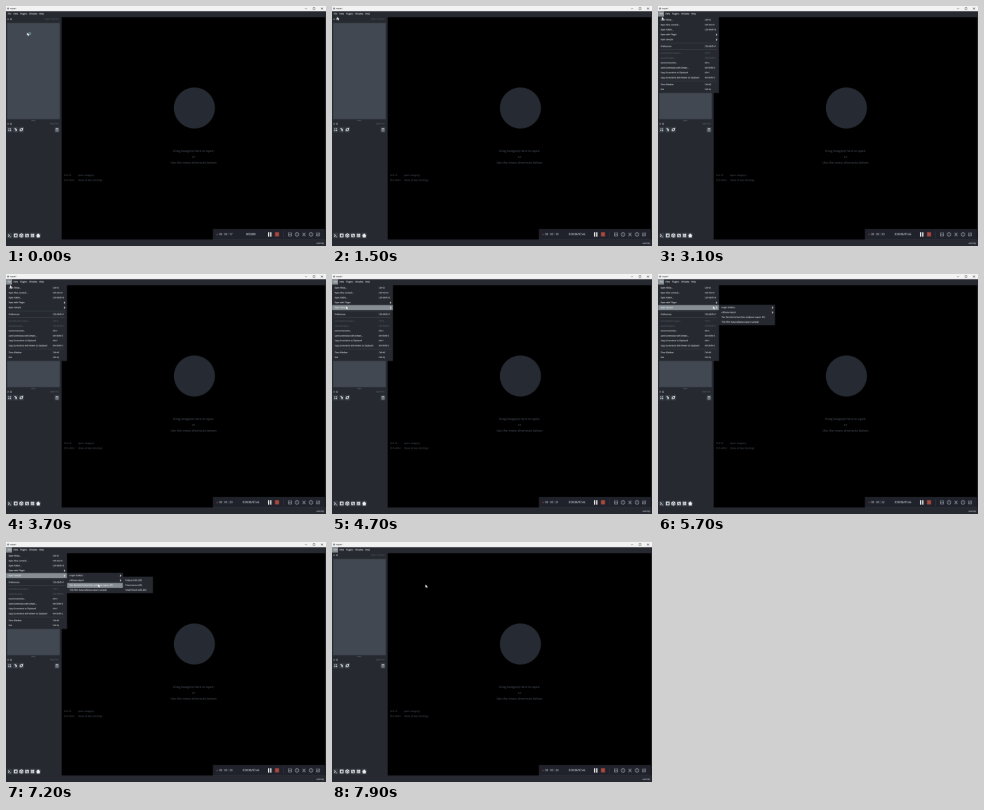
An HTML page with a canvas for the animation above (8 s loop, 320 by 240 pixels).

```html
<!DOCTYPE html>
<html lang="en">
<head>
<meta charset="utf-8">
<title>Image viewer menu</title>
<style>
html, body { margin: 0; height: 100%; overflow: hidden; background: #262930; }
canvas { display: block; width: 100vw; height: 100vh; }
</style>
</head>
<body>
<canvas id="stage" width="320" height="240"></canvas>
<script>
const LOOP = 8000;
const SCALE = 6;
const view = document.getElementById('stage').getContext('2d');
view.imageSmoothingQuality = 'high';

// The desktop is drawn large and scaled down, so tiny text stays soft.
const desktop = document.createElement('canvas');
desktop.width = 320 * SCALE;
desktop.height = 240 * SCALE;
const ctx = desktop.getContext('2d');
ctx.scale(SCALE, SCALE);

const C = {
  bg: '#262930', panel: '#414851', button: '#363c45', hover: '#868e93',
  text: '#f0f1f2', dim: '#5a626c', faint: '#414750', shape: '#262a33'
};

const FILE_MENU = [
  [14, 'Open File(s)...', 'Ctrl+O'],
  [19, 'Open Files as Stack...', 'Ctrl+Alt+O'],
  [23.8, 'Open Folder...', 'Ctrl+Shift+O'],
  [28.7, 'Open with Plugin', '>'],
  [33.6, 'Open Sample', '>'],
  [40.5, 'Preferences', 'Ctrl+Shift+P'],
  [47.2, 'Save Selected Layers...', 'Ctrl+S', true],
  [52.1, 'Save All Layers...', 'Ctrl+Shift+S', true],
  [57, 'Save Screenshot...', 'Alt+S'],
  [62, 'Save Screenshot with Viewer...', 'Alt+Shift+S'],
  [66.9, 'Copy Screenshot to Clipboard', 'Alt+C'],
  [71.8, 'Copy Screenshot with Viewer to Clipboard', 'Alt+Shift+C'],
  [78.6, 'Close Window', 'Ctrl+W'],
  [83.5, 'Exit', 'Ctrl+Q']
];
const SAMPLE_MENU = [
  [33.6, 'napari builtins', '>'],
  [38.5, 'cellpose-napari', '>'],
  [43.4, 'Two Particle Surface Data (cellpose-napari, 3D)'],
  [48.2, 'Thin Film Data (cellpose-napari, sample)']
];
const CELL_MENU = [
  [38.5, 'Embryo Cells (3D)'],
  [43.4, 'Fluorescence (2D)'],
  [48.2, 'Small Chunk Cells (2D)']
];

// time, x, y
const PATH = [
  [0, 21, 26.5], [200, 21, 26.5], [900, 9, 16], [1500, 5, 10.7],
  [2000, 5, 10.7], [2700, 3.8, 10.7], [3800, 4, 11], [4300, 9, 24],
  [4700, 14, 32], [5100, 54, 32], [5800, 55, 32], [6200, 72, 33],
  [6500, 88, 37.5], [6800, 92, 39], [7100, 92, 42], [8000, 93.5, 42.5]
];

function rect(x, y, w, h, color) {
  ctx.fillStyle = color;
  ctx.fillRect(x, y, w, h);
}

function disc(x, y, r, color) {
  ctx.fillStyle = color;
  ctx.beginPath();
  ctx.arc(x, y, r, 0, Math.PI * 2);
  ctx.fill();
}

function label(str, x, y, size = 1.95, color = C.text, align = 'left') {
  ctx.font = `600 ${size}px "Open Sans", sans-serif`;
  ctx.textAlign = align;
  ctx.textBaseline = 'middle';
  ctx.fillStyle = color;
  ctx.fillText(str, x, y);
}

function lines(color, width, ...strokes) {
  ctx.strokeStyle = color;
  ctx.lineWidth = width;
  ctx.beginPath();
  for (const points of strokes) {
    for (let i = 0; i < points.length; i += 2) {
      ctx[i ? 'lineTo' : 'moveTo'](points[i], points[i + 1]);
    }
  }
  ctx.stroke();
}

function box(x, y, size, color, width = .6) {
  ctx.strokeStyle = color;
  ctx.lineWidth = width;
  ctx.strokeRect(x - size / 2, y - size / 2, size, size);
}

function pointerAt(t) {
  const i = PATH.findIndex(p => p[0] > t);
  const [t0, x0, y0] = PATH[i - 1], [t1, x1, y1] = PATH[i];
  const k = (t - t0) / (t1 - t0), ease = k * k * (3 - 2 * k);
  return { x: x0 + (x1 - x0) * ease, y: y0 + (y1 - y0) * ease };
}

function drawTitleBar(open) {
  rect(0, 0, 320, 5.3, '#f3f3f3');
  disc(2.1, 2.6, 1, '#78848c');
  label('napari', 4, 2.6, 2, '#333');
  lines('#444', .4, [299, 2.6, 301, 2.6], [315, 1.7, 317, 3.5], [317, 1.7, 315, 3.5]);
  box(308, 2.6, 1.7, '#444', .4);
  rect(0, 5.3, 320, 5.7, C.bg);
  if (open) rect(0, 5.5, 6, 5, C.hover);
  [['File', 1.7], ['View', 7.3], ['Plugins', 14], ['Window', 23.3], ['Help', 33.3]]
    .forEach(([name, x]) => label(name, x, 8, 2.1));
}

function drawDockTitle(y, name) {
  lines('#989da3', .4, [1.5, y - .7, 2.9, y + .7], [2.9, y - .7, 1.5, y + .7]);
  box(5, y, 1.3, '#989da3', .4);
  label(name, 52.5, y, 2.1, C.dim, 'right');
}

function drawButton(x, y) {
  rect(x - 2.5, y - 2.7, 5, 5.4, C.button);
}

function drawSidePanel() {
  drawDockTitle(13.2, 'layer controls');
  rect(1.2, 17, 52.6, 96.2, C.panel);
  for (let i = 0; i < 3; i++) disc(26 + i * 1.4, 114.6, .4, '#868e93');
  drawDockTitle(117.8, 'layer list');

  [3.6, 9.6, 15.4, 51].forEach(x => drawButton(x, 123.7));
  for (const dx of [-.8, .8]) for (const dy of [-.8, .8]) disc(3.6 + dx, 123.7 + dy, .55, C.text);
  lines(C.text, 1, [8.6, 122.2, 10.2, 123.5, 10, 125.2]);
  lines(C.text, .7, [14, 124.9, 14.2, 123, 16.7, 122.2, 16.1, 124.5, 14, 124.9]);
  lines('#b4b9be', .6, [49.7, 122.3, 52.3, 122.3]);
  box(51, 124.2, 2, '#b4b9be');

  const xs = [3.6, 9.7, 15.4, 21, 26.5, 32.2], y = 229.5;
  xs.forEach(x => drawButton(x, y));
  lines(C.text, .7, [2.2, y - 1.2, 3.4, y, 2.2, y + 1.2], [3.8, y + 1.4, 5, y + 1.4]);
  box(xs[1], y, 2.8, C.text, .9);
  lines(C.text, .7, [15.4, y - 1.8, 17, y - .9, 17, y + .9, 15.4, y + 1.8,
    13.8, y + .9, 13.8, y - .9, 15.4, y - 1.8], [13.8, y - .9, 15.4, y, 17, y - .9], [15.4, y, 15.4, y + 1.8]);
  box(xs[3], y, 2.6, C.text, .7);
  lines(C.text, .6, [19.7, y + 1.2, 22.3, y - 1.2]);
  for (const dx of [-.9, .9]) for (const dy of [-.9, .9]) box(xs[4] + dx, y + dy, 1, C.text, .6);
  ctx.fillStyle = C.text;
  ctx.beginPath();
  ctx.moveTo(29.8, y);
  ctx.lineTo(32.2, y - 2.1);
  ctx.lineTo(34.6, y);
  ctx.lineTo(33.8, y);
  ctx.lineTo(33.8, y + 2);
  ctx.lineTo(30.6, y + 2);
  ctx.lineTo(30.6, y);
  ctx.fill();
}

function drawWelcome() {
  rect(55.7, 11.3, 263.5, 222.2, '#000');
  disc(188.4, 102, 20.5, C.shape);
  label('Drag image(s) here to open', 187.5, 145.2, 3.1, C.faint, 'center');
  label('or', 187.5, 151, 3.1, C.faint, 'center');
  label('Use the menu shortcuts below:', 187.5, 156.9, 3.1, C.faint, 'center');
  label('Ctrl+O', 58, 169.4, 2.4, C.faint);
  label('open image(s)', 72, 169.4, 2.4, C.faint);
  label('Ctrl+Alt+/', 58, 174.4, 2.4, C.faint);
  label('show all key bindings', 72, 174.4, 2.4, C.faint);
  label('activity', 318, 237.2, 2.2, '#e0e2e4', 'right');
}

function drawRecorder(t) {
  rect(207, 223.2, 111.5, 10.4, '#343741');
  rect(207.4, 223.6, 110.7, 9.6, '#1f212b');
  const y = 228.4, icon = '#878b94';
  disc(211, y, .6, '#a8483e');
  const seconds = 17 + Math.floor(t / 1000);
  label(`00 : 00 : ${seconds}`, 213, y, 2.7, '#c5c8cd');
  label(t < 1000 ? '000,000' : '0:00:00/07:46', 244.9, y, 2.6, '#e4e6e9', 'center');
  rect(262, 226.2, 1.3, 4.4, '#f2f2f2');
  rect(264.2, 226.2, 1.3, 4.4, '#f2f2f2');
  rect(269, 226.2, 4, 4.2, '#a8483e');
  rect(277.5, 225, .4, 7, '#373a44');
  box(284, y, 3.2, icon);
  lines(icon, .5, [282.5, y, 285.5, y]);
  for (const x of [291, 305]) {
    ctx.strokeStyle = icon;
    ctx.lineWidth = .7;
    ctx.beginPath();
    ctx.arc(x, y, 1.8, 0, Math.PI * 2);
    ctx.stroke();
    lines(icon, .5, [x, y - 2.5, x, y + .5]);
  }
  lines(icon, .8, [296.5, y + 1.8, 299.5, y - 1.7], [296.5, y - 1.6, 299.5, y + 1.8]);
  box(312, y, 3, icon);
  lines(icon, .6, [311, y + .8, 313, y - .8]);
}

function drawMenu(x, y, w, h, rows, active) {
  rect(x, y, w, h, C.bg);
  rows.forEach(([rowY, name, extra, disabled], i) => {
    const color = disabled ? C.dim : C.text;
    if (i === active) rect(x + .2, rowY - 2.5, w - .4, 5, C.hover);
    label(name, x + 2.5, rowY, 1.95, color);
    if (extra === '>') {
      lines(color, .6, [x + w - 3, rowY - .8, x + w - 2.1, rowY, x + w - 3, rowY + .8]);
    } else if (extra) {
      label(extra, x + 46.7, rowY, 1.95, color);
    }
  });
}

function rowUnder(rows, y) {
  return rows.findIndex(row => Math.abs(row[0] - y) < 2.45);
}

function drawMenus(t, p) {
  const sampleOpen = t >= 5300;
  const active = sampleOpen ? 4 : p.y > 11.6 ? rowUnder(FILE_MENU, p.y) : -1;
  drawMenu(0, 11, 61, 76, FILE_MENU, active);
  lines('#414851', .4, [2, 37.2, 59, 37.2], [2, 43.8, 59, 43.8], [2, 75.2, 59, 75.2]);
  if (sampleOpen) {
    drawMenu(61, 30.7, 56, 20.6, SAMPLE_MENU, p.x > 61 ? rowUnder(SAMPLE_MENU, p.y + .6) : -1);
  }
  if (t >= 6600) drawMenu(117, 34.6, 30, 16.6, CELL_MENU, -1);
}

function drawPointer({ x, y }, t) {
  ctx.save();
  ctx.translate(x, y);
  ctx.beginPath();
  ctx.moveTo(0, 0);
  ctx.lineTo(0, 3.2);
  ctx.lineTo(.8, 2.6);
  ctx.lineTo(1.4, 3.8);
  ctx.lineTo(2, 3.5);
  ctx.lineTo(1.5, 2.4);
  ctx.lineTo(2.4, 2.3);
  ctx.closePath();
  ctx.fillStyle = '#fff';
  ctx.fill();
  ctx.strokeStyle = '#0006';
  ctx.lineWidth = .2;
  ctx.stroke();
  if (t < 500) {
    ctx.strokeStyle = '#7cb4c8';
    ctx.lineWidth = .6;
    ctx.beginPath();
    ctx.arc(2.7, 1, 1, 0, Math.PI * 2);
    ctx.stroke();
  }
  ctx.restore();
}

function render(t) {
  const open = t >= 3000 && t < 7800;
  const pointer = pointerAt(t);
  rect(0, 0, 320, 240, C.bg);
  drawTitleBar(open || t >= 7800);
  drawSidePanel();
  drawWelcome();
  drawRecorder(t);
  if (open) drawMenus(t, pointer);
  drawPointer(pointer, t);
  view.drawImage(desktop, 0, 0, 320, 240);
}

const start = performance.now();
function tick() {
  render((performance.now() - start) % LOOP);
  requestAnimationFrame(tick);
}
tick();
</script>
</body>
</html>
```
